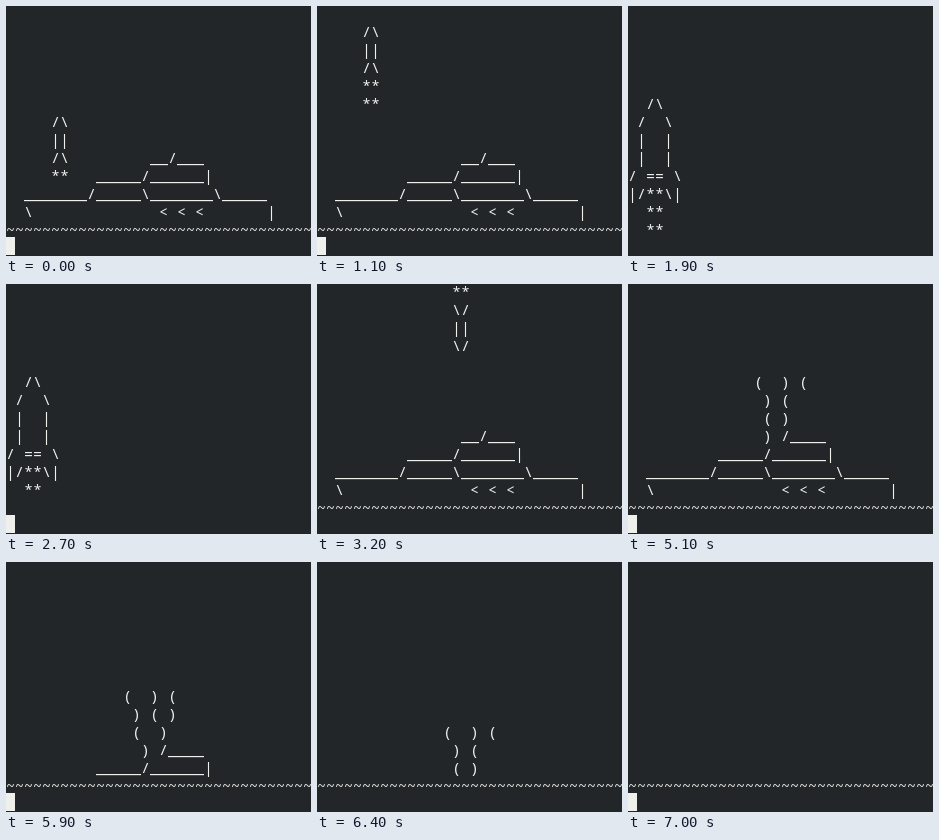
An HTML page that plays this animation: 305x250 px, repeating every 7.1 s.

```html
<!DOCTYPE html>
<html lang="en">
<head>
<meta charset="utf-8">
<title>Rocket and tank</title>
<style>
  html, body { margin: 0; width: 100%; height: 100%; overflow: hidden; background: #232629; }
  #stage { position: relative; width: 305px; height: 250px; overflow: hidden; }
  #screen {
    position: absolute; left: 0; top: -2px; margin: 0;
    font: 15px/18px "Noto Sans Mono", monospace;
    letter-spacing: calc(9px - 1ch);
    font-variant-ligatures: none;
    color: #eff0eb;
  }
  #cursor { position: absolute; left: 0; top: 231px; width: 9px; height: 18px; background: #eff0eb; }
</style>
</head>
<body>
<div id="stage"><pre id="screen"></pre><div id="cursor"></div></div>
<script>
const LOOP = 7100, COLS = 34, ROWS = 13, SEA = 12;
const screenEl = document.getElementById("screen");
const cursorEl = document.getElementById("cursor");

const BLINKS = [500, 1100, 1600, 2200, 2800, 3400, 4000, 4600, 5200, 5800, 6400, 7000];
const CLIMB = [200, 500, 600, 800, 1100, 1300];

const HULL = [
  "        _____/______|",
  "_______/_____\\_______\\_____",
  "\\              < < <       |"
];
const TANK = ["              __/___", ...HULL];
const WRECK = ["             ) /____", ...HULL];

const ROCKET = ["/\\", "||", "/\\", "**", "**"];
const DIVER = ["**", "**", "\\/", "||", "\\/"];
const SHIP = [
  "  /\\",
  " /  \\",
  " |  |",
  " |  |",
  "/ == \\",
  "|/**\\|",
  "  **",
  "  **"
];

const BLAST = ["'.\\|/.'", "(\\   /)", "- -O- -", "(/   \\)", ",'/|\\'."];
const BIG_BLAST = ["'.  \\ | /  ,'", "  `. `.' ,'", " ( .`.|,' .)", " - ~ -O- ~ -"];

const SMOKE = [
  [" (  ) (", "  ) (", "  ( )"],
  ["(  ) (", " ) ( )", " (  )"],
  [" ) ( )", " (  )", "  ) ("]
];

const passed = (times, t) => times.filter(at => t >= at).length;

// Leading blanks are see-through; blanks inside a line cover what lies below.
function put(grid, art, col, row, end = ROWS) {
  art.forEach((line, i) => {
    const y = row + i;
    if (y < 0 || y >= end) return;
    const first = line.search(/\S/);
    for (let x = first; x < line.length; x++) grid[y][col + x] = line[x];
  });
}

function drawShip(grid, t) {
  const beat = Math.floor((t < 2100 ? t : t - 100) / 100);
  put(grid, beat % 2 ? SHIP : SHIP.slice(0, -1), 0, 5);
}

function drawSea(grid) {
  put(grid, ["~".repeat(COLS)], 0, SEA);
}

function drawLaunch(grid, t) {
  put(grid, TANK, 2, 8);
  put(grid, ROCKET, 5, 6 - passed(CLIMB, t), 10);
}

function drawDive(grid, t) {
  put(grid, TANK, 2, 8);
  if (t >= 3200) put(grid, DIVER, 15, t < 3400 ? -1 : 1 + Math.floor((Math.min(t, 3999) - 3400) / 200));
}

function drawBlast(grid, t) {
  put(grid, TANK, 2, 8);
  if (t < 4300) put(grid, BLAST, 13, 4);
  else put(grid, BIG_BLAST, 9, 5);
}

function drawWreck(grid, t) {
  const tick = Math.floor((t - 4500) / 200);
  const row = 5 + Math.max(0, tick - 5);
  put(grid, SMOKE[tick % 3], 13, row, SEA);
  put(grid, WRECK, 2, row + 3, SEA);
}

function render(t) {
  const grid = Array.from({ length: ROWS }, () => Array(COLS).fill(" "));
  if (t >= 1400 && t < 3100) {
    drawShip(grid, t);
  } else {
    drawSea(grid);
    const scene = t < 1400 ? drawLaunch : t < 4200 ? drawDive : t < 4500 ? drawBlast : drawWreck;
    scene(grid, t);
  }
  const text = grid.map(row => row.join("")).join("\n");
  if (screenEl.textContent !== text) screenEl.textContent = text;
  cursorEl.style.visibility = passed(BLINKS, t) % 2 ? "hidden" : "visible";
}

const start = performance.now();
function frame() {
  render((performance.now() - start) % LOOP);
  requestAnimationFrame(frame);
}
frame();
</script>
</body>
</html>
```
